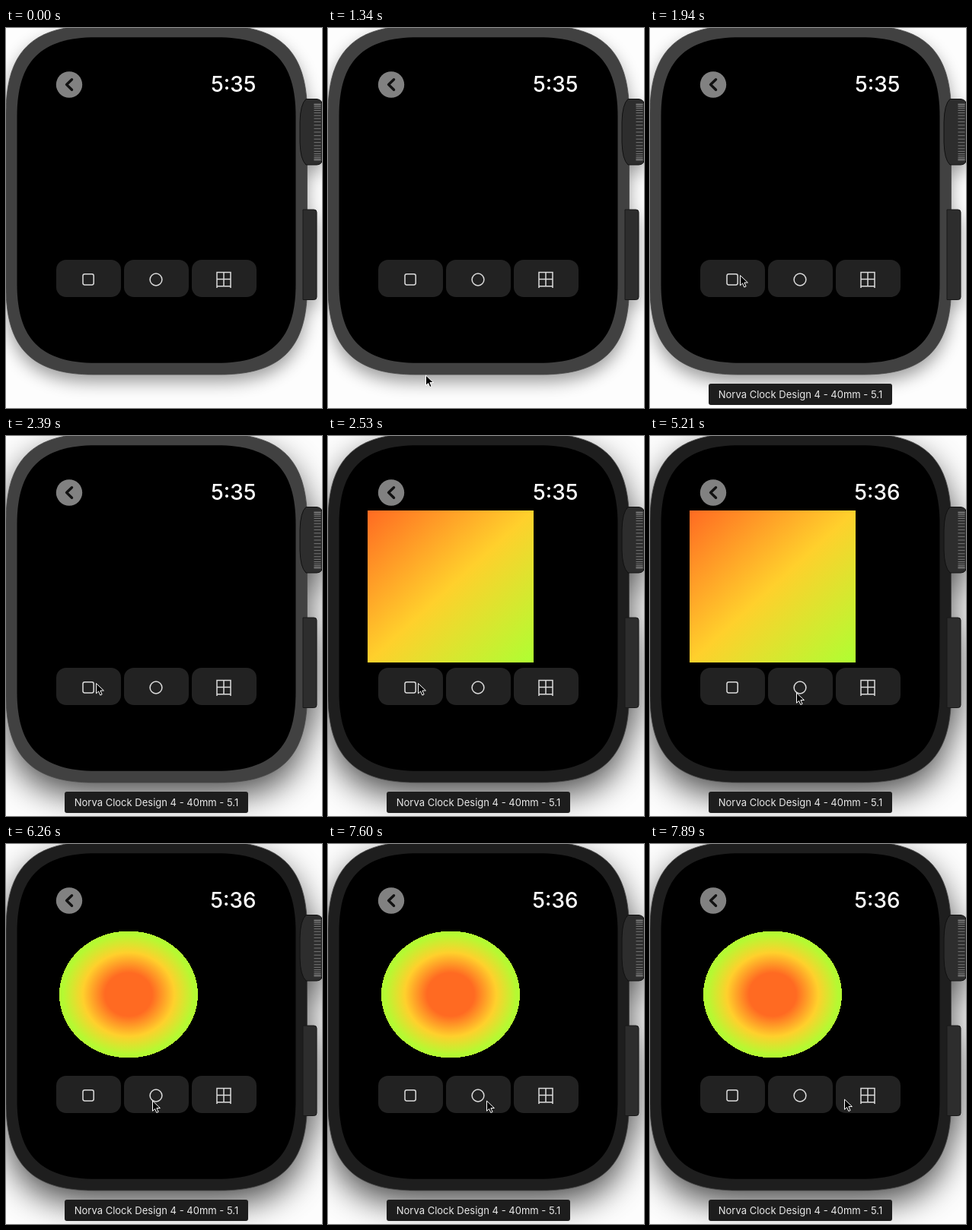
These frames come from a looping animation (415 px wide and 500 px high, 8 s). An HTML page:

```html
<!DOCTYPE html>
<html lang="en">
<head>
<meta charset="utf-8">
<title>Watch shapes</title>
<style>
  html, body { margin: 0; width: 100%; height: 100%; overflow: hidden; background: #fdfdfd; }
  svg { display: block; }
  text { font-family: Inter, "Open Sans", sans-serif; fill: #fff; }
  .icon { fill: none; stroke: #dcdcdc; stroke-width: 1.5; }
</style>
</head>
<body>
<svg width="415" height="500" viewBox="0 0 415 500">
  <defs>
    <linearGradient id="diagonal" x2="1" y2="1">
      <stop offset="0" stop-color="#ff6a22"/>
      <stop offset=".5" stop-color="#ffd02c"/>
      <stop offset="1" stop-color="#aeff32"/>
    </linearGradient>
    <radialGradient id="rings">
      <stop offset=".34" stop-color="#ff6a22"/>
      <stop offset=".66" stop-color="#ffd02c"/>
      <stop offset=".95" stop-color="#b4fa32"/>
    </radialGradient>
    <path id="crown" d="M394 93.500H408Q416 94 416 104V170Q416 180 408 180H394Q386.500 173 386 150V124Q386.500 100 394 93.500Z"/>
    <path id="key" d="M390 239H404.500Q408 239 408 242.500V354Q408 357.500 404.500 357.500H390Z"/>
    <path id="case"/>
  </defs>

  <g id="shadow"><use href="#case"/><use href="#crown"/><use href="#key"/></g>
  <use id="bezel" href="#case" stroke="#484848" stroke-width=".8"/>
  <use href="#key" fill="#2d2d2d" stroke="#181818"/>
  <use href="#crown" fill="#2d2d2d" stroke="#101010"/>
  <path id="ridges" stroke="#777"/>
  <path id="screen"/>

  <circle cx="83" cy="74.500" r="17.200" fill="#818181"/>
  <path d="M86.500 67.700L79.500 74.400L86.500 81.200" fill="none" stroke="#111" stroke-width="3.400" stroke-linecap="round" stroke-linejoin="round"/>
  <text id="clock" x="328.500" y="83.700" font-size="27.800" font-weight="500" text-anchor="end"></text>

  <rect id="square" x="52" y="98" width="218" height="200" fill="url(#diagonal)"/>
  <ellipse id="disc" cx="161" cy="198" rx="91" ry="83.500" fill="url(#rings)" shape-rendering="crispEdges"/>

  <g fill="#222">
    <rect x="66" y="305" width="85" height="49" rx="13"/>
    <rect x="155" y="305" width="85" height="49" rx="13"/>
    <rect x="244" y="305" width="85" height="49" rx="13"/>
  </g>
  <g class="icon">
    <rect x="101" y="323.700" width="14.200" height="14.200" rx="2.400"/>
    <circle cx="197" cy="331" r="7.900"/>
    <path d="M277 342V321.500H295V342M277 330.500H295M277 339.800H295M286 321.500V339.800"/>
  </g>

  <g id="tip">
    <rect x="77" y="468" width="241" height="28" rx="3" fill="#1d1d1d"/>
    <text x="197.500" y="487.300" font-size="13" text-anchor="middle" style="fill:#e9e9e9">Norva Clock Design 4 - 40mm - 5.1</text>
  </g>
  <path id="pointer" d="M.5 1V14.300L3.600 11.400L5.800 16.500L8.100 15.500L5.900 10.500H10.400Z" stroke="#fff" stroke-linejoin="round"/>
</svg>

<script>
const LOOP = 8000;
const $ = id => document.getElementById(id);

// [start ms, x, y] of the pointer, held until the next entry
const moves = [
  [900, 403, 476], [1050, 136, 459], [1190, 127, 460], [1340, 128, 456],
  [1490, 117, 402], [1640, 117, 364], [1790, 117, 334], [1940, 118, 324.5],
  [4320, 125, 323], [4470, 135, 322], [4620, 145, 325], [4770, 149, 326],
  [4910, 160, 330], [5060, 185, 336], [5210, 192, 337],
  [7600, 208, 337], [7740, 235, 335], [7890, 255, 335]
];

// Rectangle with soft corners that start c pixels from each corner
function softRect(x, y, w, h, c) {
  const e = c * 0.3, r = x + w, b = y + h;
  return `M${x + c} ${y}H${r - c}C${r - e} ${y} ${r} ${y + e} ${r} ${y + c}` +
    `V${b - c}C${r} ${b - e} ${r - e} ${b} ${r - c} ${b}` +
    `H${x + c}C${x + e} ${b} ${x} ${b - e} ${x} ${b - c}` +
    `V${y + c}C${x} ${y + e} ${x + e} ${y} ${x + c} ${y}Z`;
}

// Evenly spaced grooves on a cylinder, seen from the side
function grooves(count) {
  let d = "";
  for (let i = 0; i < count; i++) {
    const angle = ((i + 0.5) / count - 0.5) * Math.PI;
    d += `M404.5 ${137 + 37 * Math.sin(angle)}h9`;
  }
  return d;
}

function show(id, on) {
  $(id).style.display = on ? "" : "none";
}

function draw(t) {
  const focused = t >= 2390, pressed = t >= 2530;
  $("shadow").style.cssText = focused
    ? "opacity:.68;filter:blur(22px);transform:translateY(18px)"
    : "opacity:.38;filter:blur(11px);transform:translateY(10px)";
  $("bezel").setAttribute("fill", pressed ? "#1e1e1e" : "#414141");
  $("clock").textContent = t < 5210 ? "5:35" : "5:36";
  show("square", pressed && t < 6260);
  show("disc", t >= 6260);
  show("tip", t >= 1490);

  const at = moves.filter(m => m[0] <= t).pop();
  show("pointer", at);
  if (at) $("pointer").setAttribute("transform", `translate(${at[1]} ${at[2]})`);
}

$("case").setAttribute("d", softRect(0, -3, 395.5, 459, 115));
$("screen").setAttribute("d", softRect(14.5, 12.3, 366, 428.4, 104));
$("ridges").setAttribute("d", grooves(25));

const start = performance.now();
function tick() {
  draw((performance.now() - start) % LOOP);
  requestAnimationFrame(tick);
}
tick();
</script>
</body>
</html>
```
